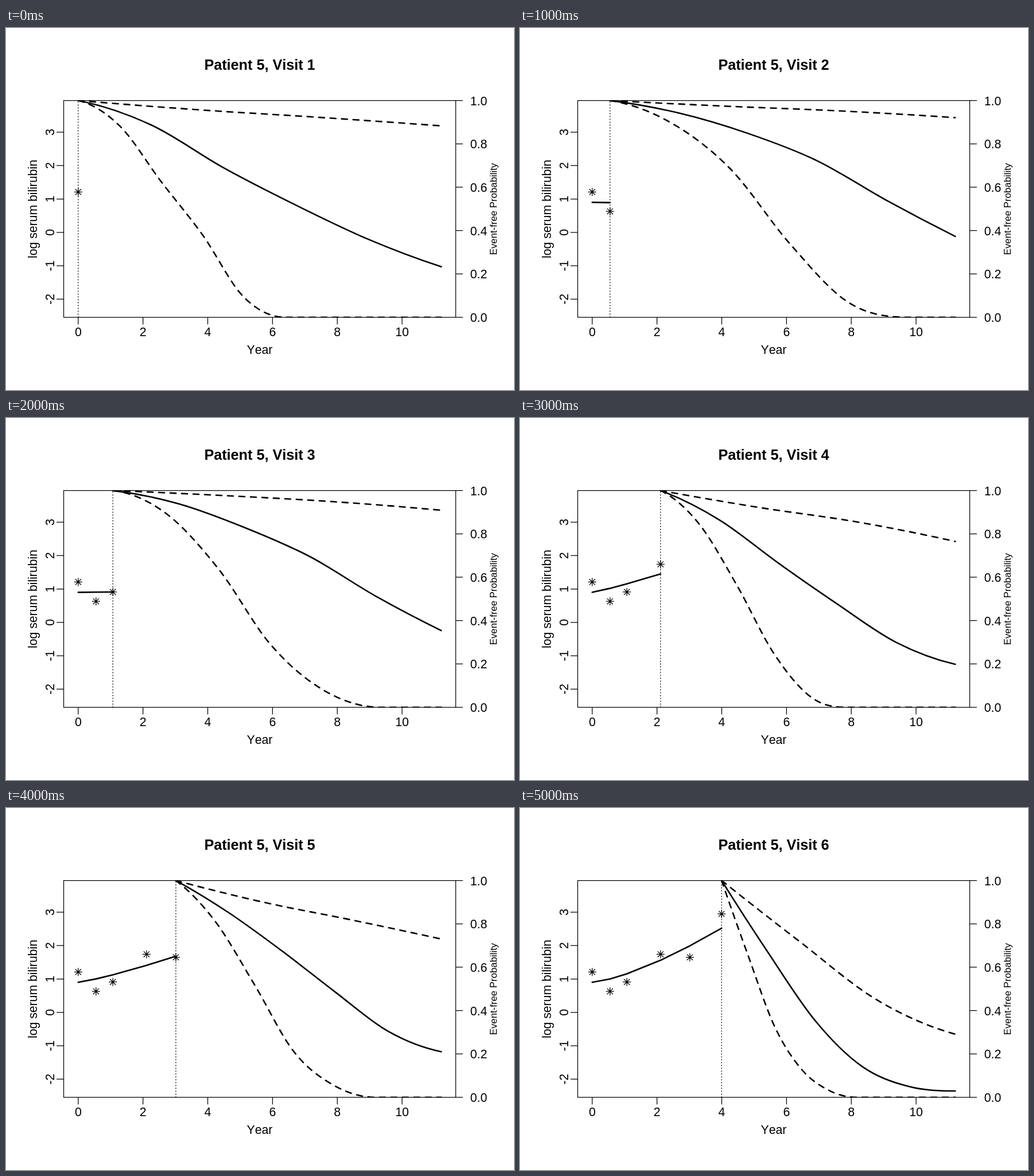
Recreate the animation shown at these times as an HTML page. Size 885 px wide and 632 px high, loop 6000 ms.

```html
<!DOCTYPE html>
<html lang="en">
<head>
<meta charset="utf-8">
<title>Event-free probability by visit</title>
<style>
  html, body { margin: 0; width: 100%; height: 100%; overflow: hidden; background: #fff; }
  svg { display: block; width: 885px; height: 632px; }
  text { font: 21.2px "Liberation Sans", Arial, sans-serif; font-kerning: none; text-anchor: middle; }
  .title { font-size: 25.2px; font-weight: bold; }
  .small { font-size: 16.8px; }
  path { fill: none; stroke: #000; stroke-width: 1.25; stroke-linecap: round; stroke-linejoin: round; }
  .curve { stroke-width: 2.6; }
  .dash { stroke-dasharray: 10 10; }
  .dot { stroke-dasharray: 1.25 3.75; }
</style>
</head>
<body>
<svg viewBox="0 0 885 632">
  <clipPath id="plot"><rect x="100.5" y="126.5" width="683" height="378.5"/></clipPath>
  <text class="title" id="title" x="442" y="73"></text>
  <text x="442" y="569">Year</text>
  <text transform="translate(54 316) rotate(-90)">log serum bilirubin</text>
  <text class="small" transform="translate(855 316) rotate(-90)">Event-free Probability</text>
  <g id="axes"></g>
  <g clip-path="url(#plot)">
    <path id="now" class="dot"/>
    <path id="stars"/>
    <path id="fit" class="curve"/>
    <path id="mid" class="curve"/>
    <path id="low" class="curve dash"/>
    <path id="high" class="curve dash"/>
  </g>
</svg>
<script>
const $ = id => document.getElementById(id);
const LAST = 11.21, HOLD = 1000, START = 0.9;
const px = year => 125.8 + 56.42 * year;
const logY = v => 356.8 - 58.3 * v;
const probY = percent => 505 - 3.784 * percent;

// Key percentages are evenly spaced from the visit to the end of each curve;
// the lower curve reaches zero in the year "gone".
const visits = [
  { year: 0, value: 1.21, level: 0.9, gone: 6.4,
    mid: [88.8, 69, 51.7, 35.9, 23.3], high: [95.7, 92.2, 88.3], low: [88.3, 62.6, 38, 9.2, 0] },
  { year: 0.55, value: 0.63, level: 0.89, gone: 9.8,
    mid: [94.2, 84.8, 72.2, 54, 37.3], high: [97.4, 95.2, 92.1], low: [90, 68.7, 34, 6.5, 0] },
  { year: 1.07, value: 0.91, level: 0.91, gone: 9.2,
    mid: [93.9, 83, 69.5, 51.3, 35.4], high: [97.7, 94.9, 90.9], low: [89.6, 64, 28.8, 7.9, 0] },
  { year: 2.11, value: 1.74, level: 1.45, gone: 8,
    mid: [86.4, 66.5, 47.6, 29.9, 19.8], high: [92.2, 85.5, 76.5], low: [84.8, 56.3, 24, 4, 0] },
  { year: 3.015, value: 1.65, level: 1.68, gone: 9.1,
    mid: [85.1, 67.5, 48.6, 30.4, 21], high: [89.9, 81.7, 73], low: [81.1, 51.8, 20.9, 5.6, 0] },
  { year: 3.995, value: 2.95, level: 2.52, gone: 8.1,
    mid: [66.6, 35.4, 14.3, 5, 2.9], high: [71.9, 44.8, 29.1], low: [65.3, 32.5, 13, 3.4, 0] }
];

// Smooth falling curve through evenly spaced heights.
function curve(from, to, percents) {
  const ys = [100, ...percents].map(probY), n = percents.length;
  const x0 = px(from), h = (px(to) - x0) / n;
  const step = i => ys[i + 1] - ys[i];
  const end = (near, next) => Math.max(0, 1.5 * near - 0.5 * next);
  const rise = i => i === 0 ? end(step(0), step(1))
    : i === n ? end(step(n - 1), step(n - 2))
    : (step(i - 1) + step(i)) / 2;
  let d = `M${x0} ${ys[0]}`;
  for (let i = 0; i < n; i++) {
    const x = x0 + i * h;
    d += `C${x + h / 3} ${ys[i] + rise(i) / 3} ${x + h * 2 / 3} ${ys[i + 1] - rise(i + 1) / 3} ${x + h} ${ys[i + 1]}`;
  }
  return d;
}

// Fitted log level so far; the bend grows with the total rise.
function trend(k) {
  const { year, level } = visits[k], gain = level - START;
  return visits.slice(0, k + 1).map((v, i) => {
    const s = year ? v.year / year : 0;
    return `${i ? "L" : "M"}${px(v.year)} ${logY(START + gain * s ** (1 + gain / 4))}`;
  }).join("");
}

function star({ year, value }) {
  const x = px(year), y = logY(value), r = 6.6, q = 4.7;
  return `M${x - r} ${y}h${2 * r}M${x} ${y - r}v${2 * r}` +
    `M${x - q} ${y - q}l${2 * q} ${2 * q}M${x - q} ${y + q}l${2 * q} ${-2 * q}`;
}

function drawAxes() {
  let d = "M100.5 126.5H783.5V505H100.5Z", labels = "";
  for (let v = 0; v <= 10; v += 2) {
    d += `M${px(v)} 505v12`;
    labels += `<text x="${px(v)}" y="538">${v}</text>`;
  }
  for (let v = -2; v <= 3; v++) {
    d += `M100.5 ${logY(v)}h-12`;
    labels += `<text transform="translate(84 ${logY(v)}) rotate(-90)">${v}</text>`;
  }
  for (let v = 0; v <= 100; v += 20) {
    d += `M783.5 ${probY(v)}h12`;
    labels += `<text x="823.5" y="${probY(v) + 8}">${(v / 100).toFixed(1)}</text>`;
  }
  $("axes").innerHTML = `<path d="${d}"/>${labels}`;
}

let shown = -1;
function render(ms) {
  const k = Math.floor(ms / HOLD) % visits.length;
  if (k === shown) return;
  shown = k;
  const v = visits[k];
  const set = (id, d) => $(id).setAttribute("d", d);
  $("title").textContent = `Patient 5, Visit ${k + 1}`;
  set("now", `M${px(v.year)} 505V126.5`);
  set("stars", visits.slice(0, k + 1).map(star).join(""));
  set("fit", k ? trend(k) : "");
  set("mid", curve(v.year, LAST, v.mid));
  set("high", curve(v.year, LAST, v.high));
  set("low", curve(v.year, v.gone, v.low) + `H${px(LAST)}`);
}

drawAxes();
const begin = performance.now();
function tick() {
  render(performance.now() - begin);
  requestAnimationFrame(tick);
}
tick();
</script>
</body>
</html>
```
